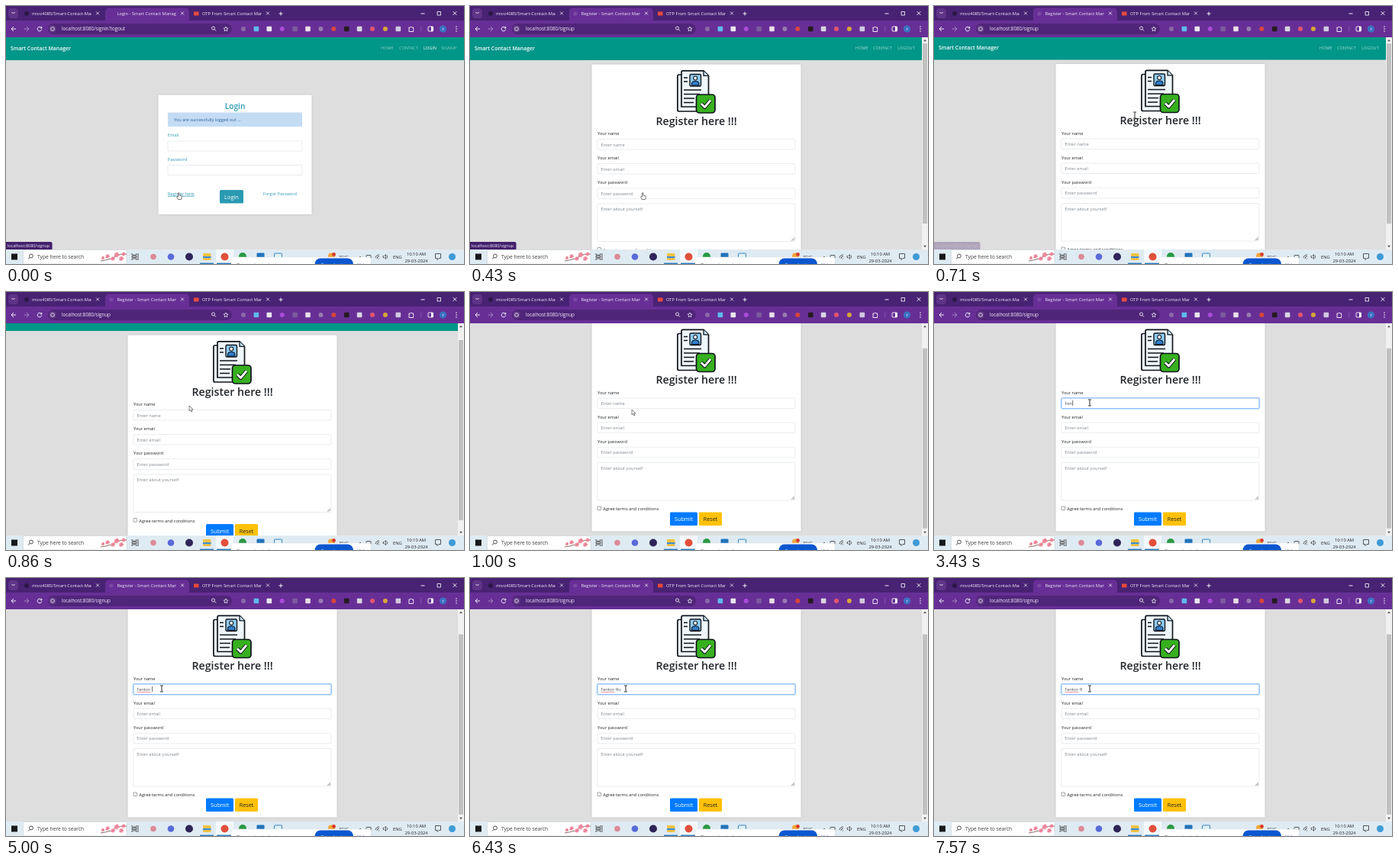
Animation, 600 px wide and 338 px high, one loop 8 s. Source, as an HTML page with a canvas:

```html
<!DOCTYPE html>
<html lang="en">
<head>
<meta charset="utf-8">
<title>Register</title>
<style>
  html, body { margin: 0; width: 100%; height: 100%; overflow: hidden; }
  canvas { display: block; }
</style>
</head>
<body>
<canvas id="stage" width="600" height="338"></canvas>
<script>
const ctx = document.getElementById('stage').getContext('2d');
const LOOP = 8000, STEPS_PER_MS = 0.007;
const FONT = '"Open Sans", "Noto Sans", sans-serif';
const TEAL = '#009688', INK = '#212529', INFO = '#2a9ab2', OUTLINE = '#10151c', BORDER = '#dadfe3';
const STRIP = '#482273', TOOLBAR = '#672f96', PILL = '#4f2579';
const NAME = 'Fenkor Rul';

// Each row holds from its step on: [step, typed letters, caret visible]
const TYPING = [[0, 0, 0], [10, 0, 1], [14, 0, 0], [18, 0, 1], [20, 1, 1], [22, 2, 1], [24, 3, 1],
  [27, 4, 1], [28, 5, 1], [29, 6, 1], [33, 6, 0], [35, 7, 1], [38, 8, 1], [41, 9, 1],
  [45, 9, 0], [47, 10, 1], [51, 9, 1], [53, 8, 0]];
// [step, pointer shape, x, y]
const POINTER = [[0, 'hand', 227, 249], [4, 'arrow', 244, 196], [5, 'beam', 263, 143],
  [6, 'arrow', 240, 149], [7, 'arrow', 212, 154], [9, 'arrow', 209, 152],
  [10, 'beam', 206, 147], [11, 'beam', 204, 145]];
const SCROLL = [[0, 0], [5, 0.5], [6, 20], [7, 35.5]];
const at = (rows, step) => rows.filter(row => row[0] <= step).pop();

function box(x, y, w, h, fill, r = 0, stroke, width = 0.6) {
  ctx.beginPath();
  ctx.roundRect(x, y, w, h, r);
  if (fill) { ctx.fillStyle = fill; ctx.fill(); }
  if (stroke) { ctx.strokeStyle = stroke; ctx.lineWidth = width; ctx.stroke(); }
}
const dot = (x, y, r, fill, stroke, width) => box(x - r, y - r, 2 * r, 2 * r, fill, r, stroke, width);

function text(str, x, y, size, color, weight = 400, align = 'left') {
  ctx.font = `${weight} ${size}px ${FONT}`;
  ctx.textAlign = align;
  ctx.fillStyle = color;
  ctx.fillText(str, x, y);
}

function path(x, y, d, stroke, width = 0.9, fill) {
  const shape = new Path2D(d);
  ctx.save();
  ctx.translate(x, y);
  if (fill) { ctx.fillStyle = fill; ctx.fill(shape); }
  if (stroke) {
    ctx.strokeStyle = stroke;
    ctx.lineWidth = width;
    ctx.lineJoin = 'round';
    ctx.stroke(shape);
  }
  ctx.restore();
}

function clipped(x, y, w, h, draw) {
  ctx.save();
  ctx.beginPath();
  ctx.rect(x, y, w, h);
  ctx.clip();
  draw();
  ctx.restore();
}

function tab(title, x, width) {
  clipped(x, 2, width, 16, () => text(title, x, 12, 5.75, '#f3edf8'));
  path(x + width + 8, 9.5, 'M-2-2 2 2M2-2-2 2', '#f3edf8', 0.8);
}

function browser(signup) {
  box(0, 0, 600, 20, STRIP);
  box(0, 19, 600, 22, TOOLBAR);
  box(130, 2.5, 110, 18, TOOLBAR, [5, 5, 0, 0]);
  box(3, 3, 13, 13, '#5f3488', 4);
  path(9.5, 9, 'M-2-1 0 1 2-1', '#fff');
  dot(27, 10, 3, '#2d1649');
  tab('mivo4085/Smart-Contact-Manager', 34, 78);
  if (signup) dot(138, 10, 2.6, '#7b49a5');
  tab((signup ? 'Register' : 'Login') + ' - Smart Contact Manager', 145.5, 77.5);
  box(246, 7.5, 6.5, 5, '#e6493c');
  tab('OTP From Smart Contact Manager', 257, 78);
  path(360, 10, 'M-2.5 0H2.5M0-2.5V2.5', '#fff');
  path(546, 10, 'M-2.5 0H2.5', '#fff');
  box(565, 7.5, 4.5, 4.5, null, 0, '#fff', 0.8);
  path(588, 9.5, 'M-2.3-2.3 2.3 2.3M2.3-2.3-2.3 2.3', '#fff');

  path(10, 30, 'M3 0H-3M0-3-3 0 0 3', '#fff');
  path(27, 30, 'M-3 0H3M0-3 3 0 0 3', '#a98cc4');
  path(44, 30, 'M2.3-1.6A2.8 2.8 0 1 0 2.8 .6M2.8-3V-1H.6', '#fff');
  box(55, 23, 241, 14, PILL, 7);
  dot(61, 30, 4.6, '#66408b');
  dot(61, 30, 2.3, null, '#fff', 0.7);
  text('localhost:8080/' + (signup ? 'signup' : 'signin?logout'), 73, 32.2, 6.25, '#f3ecfa');
  dot(271.5, 29, 2, null, '#fff', 0.8);
  path(273, 30.5, 'M0 0 2 2', '#fff');
  path(288, 30, 'M0-3 .9-1 3-.8 1.4 .7 1.9 2.8 0 1.7-1.9 2.8-1.4 .7-3-.8-.9-1Z', '#fff', 0.7);
  ['#8a68a9', '#5fb9ea', '#e9e7f0', '#a94bd8', '#7d5a9e', '#e9dfe6', '#9c7ab2', '#d8453c',
    '#261a20', '#d9d5de', '#e2566f', '#d9a53d', '#d2c8de'].forEach((color, i) => {
    const x = 311 + i * 16.9;
    if ([0, 3, 6, 7, 10, 11].includes(i)) dot(x, 30, 3, color);
    else box(x - 3.3, 26.7, 6.6, 6.6, color, 1);
  });
  path(531, 30, 'M-3-2H-1A1.1 1.1 0 0 1 1-2H2.5V0A1.1 1.1 0 0 1 2.5 2V3.5H-3Z', '#fff', 0.9);
  box(543.5, 26, 0.6, 8, '#8c66b2');
  box(553, 27, 6.5, 6, null, 1, '#fff', 0.9);
  box(557, 27, 2.5, 6, '#fff');
  dot(572.5, 30, 4.6, '#3c73c4');
  text('r', 572.5, 32, 5.4, '#fff', 400, 'center');
  [27, 30, 33].forEach(y => dot(590, y, 0.75, '#fff'));
}

function header(y, width, links) {
  box(0, y, width, 30, TEAL);
  text('Smart Contact Manager', 6, y + 16.7, 6.9, '#fff', 600);
  links.forEach(([label, x, color]) => text(label, x, y + 16, 5.6, color));
}

function card(x, y, w, h) {
  ctx.save();
  ctx.shadowColor = 'rgba(0,0,0,.15)';
  ctx.shadowBlur = 3;
  box(x, y, w, h, '#fff', 1);
  ctx.restore();
}

function loginPage() {
  const dim = '#8fd0c8';
  header(41, 600, [['HOME', 491, dim], ['CONTACT', 515, dim], ['LOGIN', 547, '#fff'], ['SIGNUP', 570, dim]]);
  card(199.5, 116.5, 201, 156.5);
  text('Login', 300, 135, 10.2, INFO, 600, 'center');
  box(212, 139.5, 176, 18.5, '#c3dcf4', 1);
  text('You are successfully logged out ...', 220, 151.3, 5.65, '#285f9c');
  text('Email', 212, 171, 5.65, INFO);
  box(212, 177, 176, 13, '#fff', 1, BORDER);
  text('Password', 212, 203.2, 5.65, INFO);
  box(212, 208.5, 176, 13, '#fff', 1, BORDER);
  text('Register here', 212, 247.8, 5.65, INFO);
  box(212, 248.8, 35, 0.6, INFO);
  box(280, 241, 31, 17.5, INFO, 1.5);
  text('Login', 295.5, 252.6, 7.4, '#fff', 400, 'center');
  text('Forgot Password', 337, 247.8, 5.65, INFO);
}

function documentIcon(x, y) {
  const paper = '#eef7fb';
  ctx.save();
  ctx.translate(x, y);
  box(0.9, 6, 36, 48, paper, 2, OUTLINE, 1.7);
  path(0, 0, 'M8 .9H35L41.5 7.4V48H6V2.9Q6 .9 8 .9Z', OUTLINE, 1.7, paper);
  path(0, 0, 'M35 .9V7.4H41.5', OUTLINE, 1.3, '#c6e4f4');
  box(17, 5.5, 14.5, 15.5, '#8fcdf3', 1.5, OUTLINE, 1.4);
  dot(24.2, 10.5, 2.5, '#fff', OUTLINE, 1.1);
  path(19.5, 20, 'M0 0V-2Q0-5.5 4.7-5.5T9.4-2V0Z', OUTLINE, 1.1, '#2f7fd0');
  path(0, 0, 'M9 10H14M9 15H14M9 26H32M9 31.5H30M9 37H23M9 42.5H22', OUTLINE, 1.3);
  box(25.5, 32, 24.5, 24, '#37b01f', 4, OUTLINE, 1.7);
  const tick = 'M32 44 36.5 48.5 44 39.5';
  path(0, 0, tick, OUTLINE, 5);
  path(0, 0, tick, '#fff', 2.8);
  ctx.restore();
}

function field(y, h, placeholder, label) {
  if (label) text(label, 167, y - 5.5, 5.65, INK);
  box(167, y, 259, h, '#fff', 1.5, BORDER);
  text(placeholder, 171.5, y + 9, 5.75, '#7f878e');
}

function nameField(step) {
  const [, count, caret] = at(TYPING, step);
  const typed = NAME.slice(0, count);
  field(139, 13.5, typed ? '' : 'Enter name', 'Your name');
  if (step >= 10) {
    ctx.globalAlpha = step === 10 ? 0.5 : 1;
    box(166.5, 138.5, 260, 14.5, null, 2, '#bfdcff', 1.6);
    box(167, 139, 259, 13.5, null, 1.5, '#74b2f8', 0.7);
    ctx.globalAlpha = 1;
  }
  text(typed, 171.5, 148, 5.6, '#495057');
  if (caret) box(172 + ctx.measureText(typed).width, 142, 0.7, 7, '#333');
  if (count > 6) {
    const wordWidth = ctx.measureText(NAME.slice(0, 6)).width;
    box(171.5, 149, wordWidth, 0.7, '#e8646a');
  }
}

// Laid out as seen when scrolled to the bottom, so it is shifted down by what is left to scroll.
function signupPage(step) {
  const scroll = at(SCROLL, step)[1];
  ctx.save();
  ctx.translate(0, 35.5 - scroll);
  const dim = '#a5d9d3';
  header(5.5, 592, [['HOME', 505, dim], ['CONTACT', 528, dim], ['LOGOUT', 560, dim]]);
  card(159.5, 41, 274, 272.5);
  documentIcon(271, 48.5);
  text('Register here !!!', 296.5, 120.3, 14.2, INK, 600, 'center');
  nameField(step);
  field(171, 13.5, 'Enter email', 'Your email');
  field(203.3, 13.5, 'Enter password', 'Your password');
  field(223.5, 49.5, 'Enter about yourself');
  path(425, 272, 'M-4 0 0-4M-2 0 0-2', '#555', 0.6);
  box(167, 281, 4.6, 4.6, '#fff', 0.8, '#767676', 0.7);
  text('Agree terms and conditions', 174.3, 286, 5.7, INK);
  box(262, 288.5, 36, 17.5, '#007bff', 1.5);
  text('Submit', 280, 300, 7.3, '#fff', 400, 'center');
  box(300, 288.5, 30, 17.5, '#ffc107', 1.5);
  text('Reset', 315, 300, 7.2, INK, 400, 'center');
  ctx.restore();

  box(592, 41, 8, 278, '#f1f1f1');
  box(593, 49 + scroll * 0.7, 6, 236, '#c1c1c1');
  path(596, 45, 'M-2 1.2 0-1.2 2 1.2Z', null, 0, '#555');
  path(596, 315, 'M-2-1.2 0 1.2 2-1.2Z', null, 0, '#555');
}

function statusBubble(alpha) {
  ctx.globalAlpha = alpha;
  box(0, 309, 60.5, 10, '#43206b', [0, 2, 0, 0]);
  text('localhost:8080/signup', 2, 316, 5.4, '#f3ecfa');
  ctx.globalAlpha = 1;
}

function blossoms() {
  path(124, 333, 'M0 1Q14-1 20-5T34-8', '#6b4a42', 0.8);
  [[127, 330, 2], [133, 328, 2.6], [140, 331, 2.6], [145, 326, 3.2], [151, 331, 2.8], [154, 325, 2.4]]
    .forEach(([x, y, r]) => {
      for (let i = 0; i < 5; i++) {
        const a = i * Math.PI * 0.4;
        dot(x + r * 0.6 * Math.cos(a), y + r * 0.6 * Math.sin(a), r * 0.5, i % 2 ? '#f3a3b4' : '#ee8299');
      }
      dot(x, y, 0.6, '#b93a56');
    });
}

function taskbar() {
  box(0, 319, 600, 19, '#dfebf2');
  box(7, 324.5, 8, 8, '#16181c');
  box(22.5, 319.5, 135.5, 18.5, '#fff', 0, '#c6ced4');
  dot(33, 327.5, 2.4, null, '#222', 0.8);
  path(31.3, 329.3, 'M0 0-2.2 2.2', '#222');
  text('Type here to search', 41, 331, 6.7, '#3c3c3c');
  blossoms();

  path(169, 328.5, 'M-4-4.5V-2.5H2V-4.5M-4 4.5V2.5H2V4.5M-4-1H2V1H-4ZM4-4.5V4.5', '#333', 0.8);
  dot(193, 328.5, 3.8, '#dc8a96');
  dot(216, 328.5, 4.3, '#5969d8');
  dot(240, 328.5, 5, '#2f2458');
  box(258, 324, 10.5, 9, '#f4c243', 1);
  box(258, 328, 10.5, 2.2, '#3f8fd8');
  box(275, 319, 23, 19, '#f3f8fa');
  dot(286.5, 328.5, 5, '#e2503c');
  dot(310, 328, 5, '#2b9a45');
  box(328.5, 323.5, 10, 9, '#2173bb', 1);
  box(351.5, 324, 10, 9, '#e4f1f8', 1, '#2d84c4', 1);
  box(254, 336.6, 18, 1.4, '#2779bd');
  box(276, 336.6, 21, 1.4, '#2779bd');

  box(422, 323.5, 9, 9, '#f3a63b', 4);
  dot(429.5, 325.5, 2.4, '#d83b2d');
  text('30°C', 436, 331, 5.8, '#222');
  path(464, 329, 'M-2 1 0-1 2 1', '#333', 0.8);
  box(472, 326.5, 6, 4, null, 0.5, '#333', 0.8);
  path(487, 331, 'M-3-1A5 5 0 0 1 2-5M-1 0A3 3 0 0 1 2-3M1 0H2', '#333', 0.8);
  path(497, 328.5, 'M-3-1H-1.5L.5-3V3L-1.5 1H-3ZM2-2Q3.5 0 2 2', '#333', 0.7);
  text('ENG', 507, 330.8, 5.8, '#222');
  text('10:10 AM', 537.5, 326.7, 5.8, '#222', 400, 'center');
  text('29-03-2024', 537.5, 335.8, 5.8, '#222', 400, 'center');
  path(566, 328, 'M-3.5-3.5H3.5V2.5H1L-1 4.5V2.5H-3.5Z', '#333', 0.8);
  dot(584.5, 328.5, 4.5, '#3f9bd6');

  box(295, 329, 183, 12, '#fff', [2, 2, 0, 0], '#d8dde1', 0.5);
  text('This window is sharing your screen.', 302, 340.8, 5.6, '#666');
  box(404.5, 330.5, 50.5, 15, '#0b57d0', 7.5);
  text('Stop sharing', 429.7, 340.5, 5.8, '#fff', 400, 'center');
  text('Hide', 460, 340.8, 5.6, '#0b57d0');
}

function pointer([, shape, x, y]) {
  if (shape === 'hand') {
    path(x, y, 'M-1.6 4.5-3.4 1.2Q-3-.2-1.5 1V-4Q-.8-5 0-4V-1L3-.3Q3.6 .2 3.3 2L2.6 4.5Z', '#444', 0.7, '#fff');
  } else if (shape === 'arrow') {
    path(x, y, 'M0 0V7L1.7 5.5 2.9 8 4 7.5 2.9 5H5Z', '#333', 0.6, '#fff');
  } else {
    path(x, y, 'M-2-4H-.6L0-3.5 .6-4H2M0-3.5V3.5M-2 4H-.6L0 3.5 .6 4H2', '#111', 0.9);
  }
}

function frame(now) {
  const step = Math.floor((now % LOOP) * STEPS_PER_MS + 0.04);
  const signup = step >= 2;
  box(0, 0, 600, 338, '#dedede');
  clipped(0, 41, 600, 278, () => signup ? signupPage(step) : loginPage());
  if (step < 6) statusBubble(step < 5 ? 1 : 0.3);
  browser(signup);
  taskbar();
  pointer(at(POINTER, step));
  requestAnimationFrame(frame);
}
requestAnimationFrame(frame);
</script>
</body>
</html>
```
